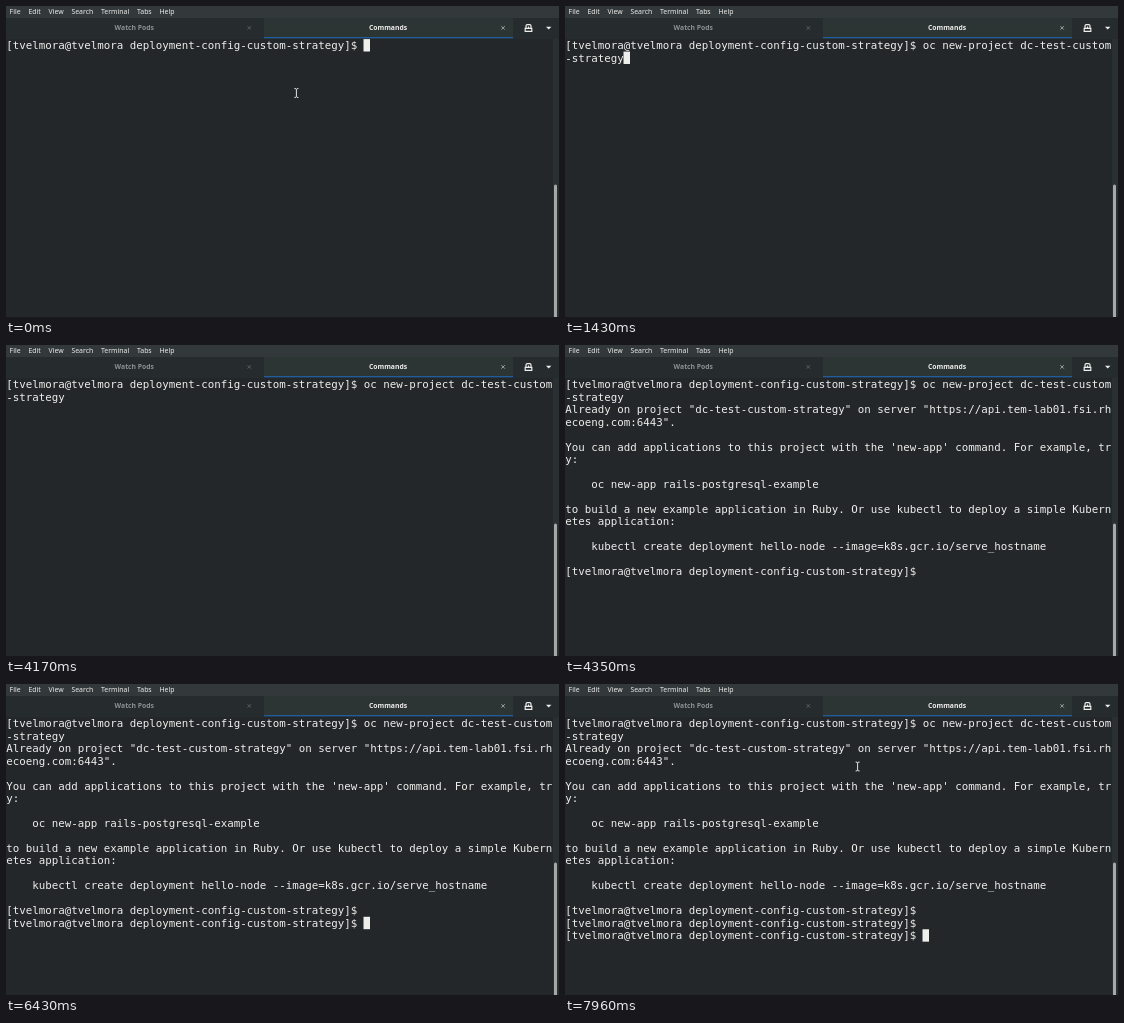
These frames come from a looping animation (553 by 311 pixels, 8000 ms). An HTML page:

```html
<!DOCTYPE html>
<html lang="en">
<head>
<meta charset="utf-8">
<title>Terminal</title>
<style>
html, body { margin: 0; width: 100%; height: 100%; overflow: hidden; background: #232729; }
svg { display: block; width: 100%; height: 100%; }
text { white-space: pre; }
.ui { font: 6.9px "Noto Sans", "Open Sans", sans-serif; fill: #eeeeec; }
.menu { word-spacing: 6px; }
.tab { font-size: 6.8px; font-weight: 600; text-anchor: middle; }
.mono { font: 10.8px "DejaVu Sans Mono", monospace; fill: #eeeeec; }
</style>
</head>
<body>
<svg viewBox="0 0 553 311" xmlns="http://www.w3.org/2000/svg">
  <rect width="553" height="311" fill="#232729"/>
  <rect width="553" height="12" fill="#33393b"/>
  <rect y="12" width="553" height="21" fill="#262c2d"/>
  <rect x="258" y="12" width="249" height="20" fill="#2d3434"/>
  <rect x="258" y="31" width="249" height="1.3" fill="#215d9c"/>
  <text class="ui menu" x="3.6" y="7.6">File Edit View Search Terminal Tabs Help</text>
  <text class="ui tab" x="128.3" y="24.4" style="fill:#8b9190">Watch Pods</text>
  <text class="ui tab" x="382" y="24.4">Commands</text>
  <path d="M241.6 20.2l3.4 3.4m0-3.4l-3.4 3.4" stroke="#5f6666" stroke-width=".9"/>
  <path d="M495.4 20.2l3.4 3.4m0-3.4l-3.4 3.4" stroke="#a9adab" stroke-width=".9"/>
  <path d="M520 22.4v-2.4q0-1.3 1.3-1.3h2.4q1.3 0 1.3 1.3v2.4M519.2 22.4v3h6.6v-3zM522.5 20.4v2" fill="none" stroke="#eeeeec" stroke-width="1.2"/>
  <path d="M540 20.7h5.4l-2.7 2.9z" fill="#eeeeec"/>
  <rect x="547" y="33" width="6" height="278" fill="#2a3031"/>
  <rect x="548" y="178.5" width="3" height="140" rx="1.5" fill="#a5a8a7"/>
  <g id="screen" class="mono"></g>
  <rect id="cursor" width="6.5" height="12.4" fill="#eeeeec"/>
  <path id="pointer" d="M-2-4.5Q0-4.5 0-3.5Q0-4.5 2-4.5M0-3.5v7M-2 4.5Q0 4.5 0 3.5Q0 4.5 2 4.5" fill="none" stroke="#e4e6e4"/>
</svg>
<script>
const LOOP = 8000, COLS = 84, CELL = 6.5, ROW = 12.48, TOP = 33.1;
const BLINK_ON = 560, BLINK = 1170;
const [screen, cursor, pointer] = ["screen", "cursor", "pointer"].map(id => document.getElementById(id));

const prompt = "[tvelmora@tvelmora deployment-config-custom-strategy]$ ";
const reply = `Already on project "dc-test-custom-strategy" on server "https://api.tem-lab01.fsi.rhecoeng.com:6443".

You can add applications to this project with the 'new-app' command. For example, try:

    oc new-app rails-postgresql-example

to build a new example application in Ruby. Or use kubectl to deploy a simple Kubernetes application:

    kubectl create deployment hello-node --image=k8s.gcr.io/serve_hostname

`;

// Text written to the terminal, with its time
const writes = [
  [0, prompt],
  [1430, "oc new-project dc-test-custom-strategy"],
  [3610, "\n"],
  [4350, reply + prompt],
  [6390, "\n"],
  [6430, prompt],
  [6520, "\n" + prompt]
];

// The blink restarts with each span and stays dark between spans
const blinkSpans = [[-260, 740], [740, 1180], [1180, 3610], [3610, 5900], [6390, 6520], [6520, LOOP]];

const wrap = line => line.match(new RegExp(`.{1,${COLS}}`, "g")) || [""];
const clamp01 = v => Math.min(1, Math.max(0, v));

function set(el, attrs) {
  for (const name in attrs) el.setAttribute(name, attrs[name]);
}

let shownText = "", lines = [""];
function showText(text) {
  if (text === shownText) return;
  shownText = text;
  lines = text.split("\n").flatMap(wrap);
  screen.replaceChildren(...lines.map((line, i) => {
    const el = document.createElementNS("http://www.w3.org/2000/svg", "text");
    set(el, { x: 0.3, y: TOP + i * ROW + 10 });
    el.textContent = line;
    return el;
  }));
}

function cursorLit(t) {
  const span = blinkSpans.find(([from, to]) => t >= from && t < to);
  return Boolean(span) && (t - span[0]) % BLINK < BLINK_ON;
}

function draw(t) {
  showText(writes.filter(([at]) => at <= t).map(([, text]) => text).join(""));

  const row = lines.length - 1;
  set(cursor, {
    x: lines[row].length * CELL,
    y: TOP + row * ROW,
    visibility: cursorLit(t) ? "visible" : "hidden"
  });

  const moved = clamp01((t - 260) / 260);
  set(pointer, {
    transform: `translate(${290.4 + 2.2 * moved} ${87 - 4.5 * moved})`,
    visibility: t < 1130 || t >= 7910 ? "visible" : "hidden"
  });
}

const start = performance.now();
function tick() {
  draw((performance.now() - start) % LOOP);
  requestAnimationFrame(tick);
}
tick();
</script>
</body>
</html>
```
